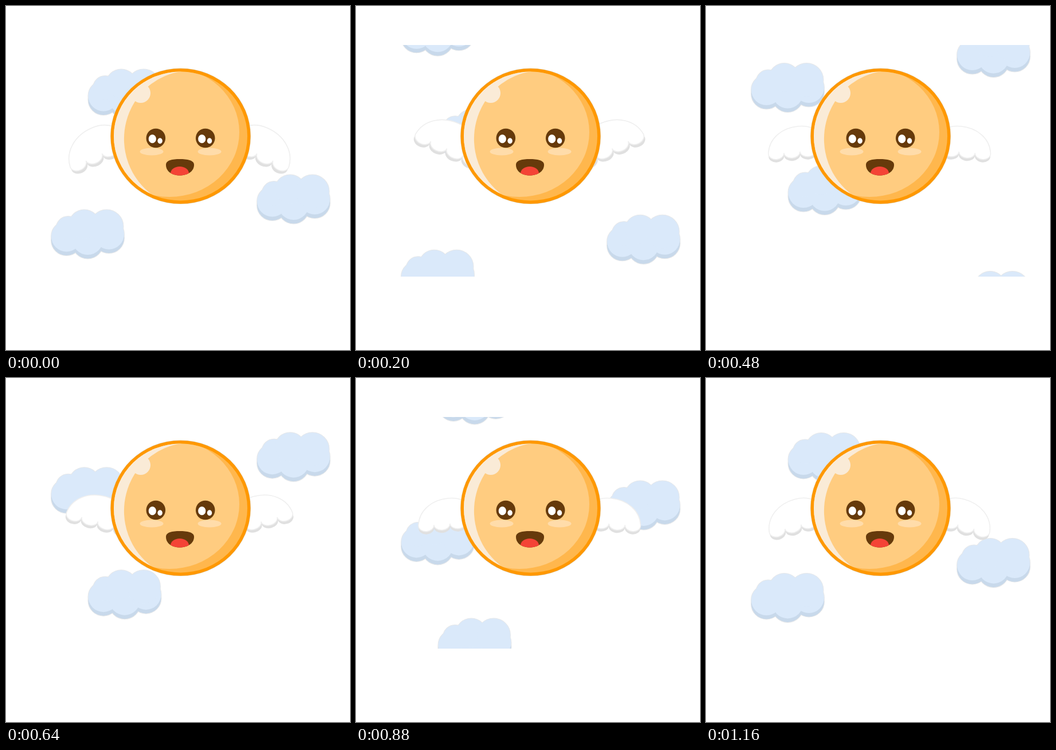
An HTML page for the animation above (1200 ms loop, 600 px wide and 600 px high).

```html
<!DOCTYPE html>
<html lang="en">
<head>
<meta charset="utf-8">
<title>Flying coin</title>
<style>
  html, body { margin: 0; width: 100%; height: 100%; overflow: hidden; background: #fff; }
  svg { display: block; width: 100%; height: 100%; }
</style>
</head>
<body>
<svg viewBox="0 0 600 600">
  <defs>
    <clipPath id="sky"><rect x="78" y="68" width="488" height="404"/></clipPath>
    <clipPath id="face"><ellipse cx="304.5" cy="227" rx="116.5" ry="112.5"/></clipPath>
    <path id="lips" d="M279 277C279 269 290 267 303 267S328 269 328 277C328 289 316 295.5 303 295.5S279 289 279 277Z"/>
    <clipPath id="mouth"><use href="#lips"/></clipPath>

    <g id="puffs">
      <circle cx="27" cy="47" r="26.5"/>
      <circle cx="64" cy="52" r="27"/>
      <circle cx="101" cy="43" r="26.5"/>
    </g>
    <g id="tops">
      <circle cx="30" cy="33" r="21"/>
      <ellipse cx="58" cy="25.5" rx="26" ry="25"/>
      <circle cx="97" cy="29.5" r="29"/>
    </g>
    <g id="cloud">
      <g stroke="#e6e8ea" stroke-width="2" fill="#c8d9eb">
        <use href="#puffs" y="6.5"/>
        <use href="#puffs"/>
        <use href="#tops"/>
      </g>
      <use href="#puffs" y="6.5" fill="#c8d9eb"/>
      <g fill="#dae9fa"><use href="#puffs"/><use href="#tops"/></g>
    </g>

    <path id="feathers" d="M-65 9C-62 -17 -38 -34 -9 -34C10 -34 24 -27 34 -10L46 10A14 10 0 0 1 18 10A14 10 0 0 1 -10 10A14 10 0 0 1 -38 10A13.5 10.5 0 0 1 -65 9Z"/>
    <g id="wing">
      <use href="#feathers" y="5" fill="#e0e0e0"/>
      <use href="#feathers" fill="#fff" stroke="#efefef" stroke-width="1.5"/>
    </g>
    <g id="eye">
      <circle r="16.8" fill="#663a0b"/>
      <ellipse cx="-6" cy="1.3" rx="6.6" ry="7.5" fill="#fff"/>
      <ellipse cx="7.3" cy="4.7" rx="4.2" ry="5" fill="#fff"/>
    </g>
  </defs>

  <g id="clouds" clip-path="url(#sky)"></g>
  <use id="left" href="#wing"/>
  <use id="right" href="#wing"/>

  <ellipse cx="304.5" cy="227" rx="122.5" ry="118.5" fill="#d8d4cc"/>
  <ellipse cx="304.5" cy="227" rx="122" ry="118" fill="#ff9800"/>
  <g clip-path="url(#face)">
    <rect x="180" y="105" width="250" height="245" fill="#ffb74d"/>
    <ellipse cx="285" cy="220" rx="122" ry="113" fill="#ffcc80"/>
    <path fill="#faebd7" d="M312 105V113.4A116 119 0 0 0 257 330.6V350H180V105Z"/>
    <circle cx="235" cy="152" r="17" fill="#faebd7"/>
  </g>
  <use href="#eye" x="261.3" y="230.5"/>
  <use href="#eye" x="347.7" y="230.5"/>
  <g fill="#ffdcaa">
    <ellipse cx="254" cy="254" rx="20.5" ry="6.5"/>
    <ellipse cx="355" cy="254" rx="20.5" ry="6.5"/>
  </g>
  <use href="#lips" fill="#663a0b"/>
  <ellipse cx="303" cy="292" rx="16" ry="12" fill="#f44336" clip-path="url(#mouth)"/>
</svg>
<script>
  const LOOP = 1200, STEP = 40, FLAP = 400, SPAN = 424, LEAN = 0.445;
  const byId = id => document.getElementById(id);

  // Copies one span above and below cover the wrap.
  const clouds = [[78.5, 355], [437.5, 294], [143, 110]].flatMap(([x, y]) =>
    [-SPAN, 0, SPAN].map(shift => {
      const el = document.createElementNS("http://www.w3.org/2000/svg", "use");
      el.setAttribute("href", "#cloud");
      byId("clouds").append(el);
      return { el, x, y, shift };
    }));

  // The fall speeds up slightly near the end of the loop.
  const fall = t => t < 1000 ? 0.351 * t : 351 + 0.365 * (t - 1000);

  function draw(t) {
    const drop = fall(t);
    for (const { el, x, y, shift } of clouds) {
      el.setAttribute("transform", `translate(${x} ${(y + drop) % SPAN + shift})`);
    }
    const raised = 1 - Math.abs(1 - (t % FLAP) / (FLAP / 2));
    const k = LEAN * (2 * raised - 1);
    byId("left").setAttribute("transform", `matrix(1 ${k} ${-k} 1 173 243)`);
    byId("right").setAttribute("transform", `matrix(-1 ${k} ${k} 1 432.2 243)`);
  }

  const start = performance.now();
  function tick() {
    const t = (performance.now() - start) % LOOP;
    draw(Math.floor(t / STEP) * STEP);
    requestAnimationFrame(tick);
  }
  draw(0);
  requestAnimationFrame(tick);
</script>
</body>
</html>
```
